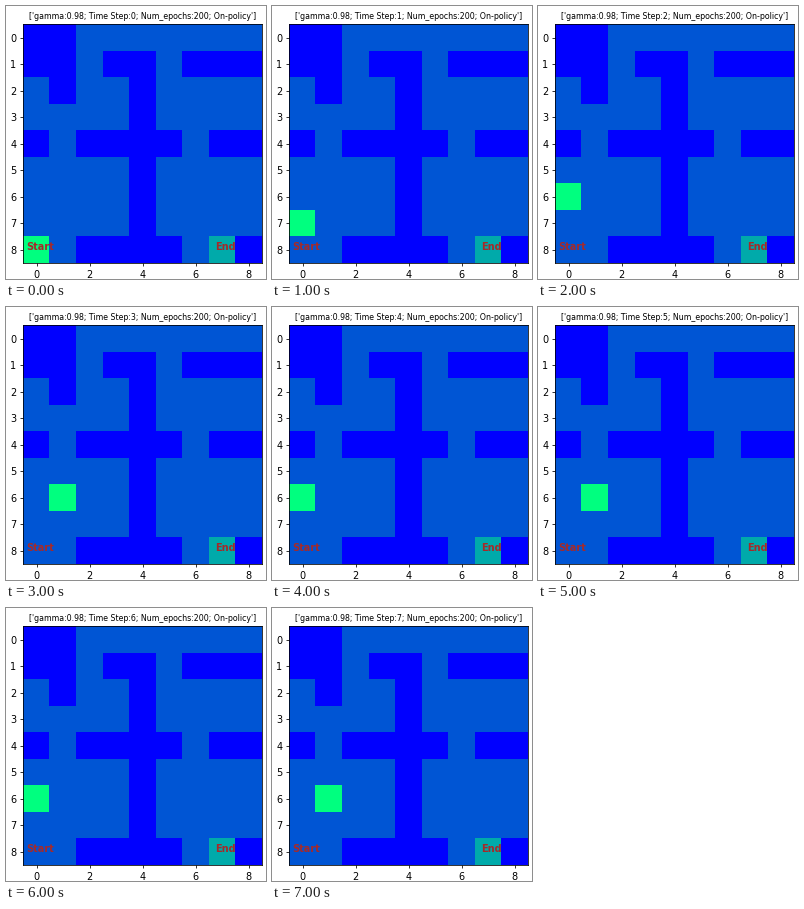
A matplotlib script that plays this animation: 260 by 273 pixels, repeating every 8 s.

```python
import matplotlib.pyplot as plt
import numpy as np
from matplotlib.animation import FuncAnimation

W, H, DPI = 260, 273, 70.5
LEFT, TOP, SIDE = 17.4, 18.4, 238.5

# '#' is a wall, '.' is open floor
MAZE = [
    "##.......",
    "##.##.###",
    ".#..#....",
    "....#....",
    "#.####.##",
    "....#....",
    "....#....",
    "....#....",
    "..####..#",
]
WALL, FLOOR, GOAL, AGENT = 0, 1, 2, 3
GOAL_CELL = (8, 7)
PATH = [(8, 0), (7, 0), (6, 0), (6, 1), (6, 0), (6, 1), (6, 0), (6, 1)]

base = np.array([[WALL if c == "#" else FLOOR for c in row] for row in MAZE])
base[GOAL_CELL] = GOAL


def grid_at(step):
    grid = base.copy()
    grid[PATH[step]] = AGENT
    return grid


def caption(step):
    return f"['gamma:0.98; Time Step:{step}; Num_epochs:200; On-policy']"


plt.rcParams["font.family"] = "DejaVu Sans"
fig = plt.figure(figsize=((W + 0.001) / DPI, (H + 0.001) / DPI), dpi=DPI,
                 facecolor="white")
ax = fig.add_axes([LEFT / W, 1 - (TOP + SIDE) / H, SIDE / W, SIDE / H])
image = ax.imshow(grid_at(0), cmap="winter", vmin=WALL, vmax=AGENT,
                  interpolation="nearest", aspect="auto")
ax.set_xticks(range(0, 9, 2))
ax.set_yticks(range(9))
title = ax.set_title(caption(0), fontsize=8)

for x, word in ((0.12, "Start"), (7.12, "End")):
    ax.text(x, 8, word, color="brown", fontsize=10, weight="bold", ha="center")


def update(step):
    image.set_data(grid_at(step))
    title.set_text(caption(step))
    return image, title


anim = FuncAnimation(fig, update, frames=len(PATH), interval=1000,
                     repeat=True, repeat_delay=0, blit=False)
plt.show()
```
